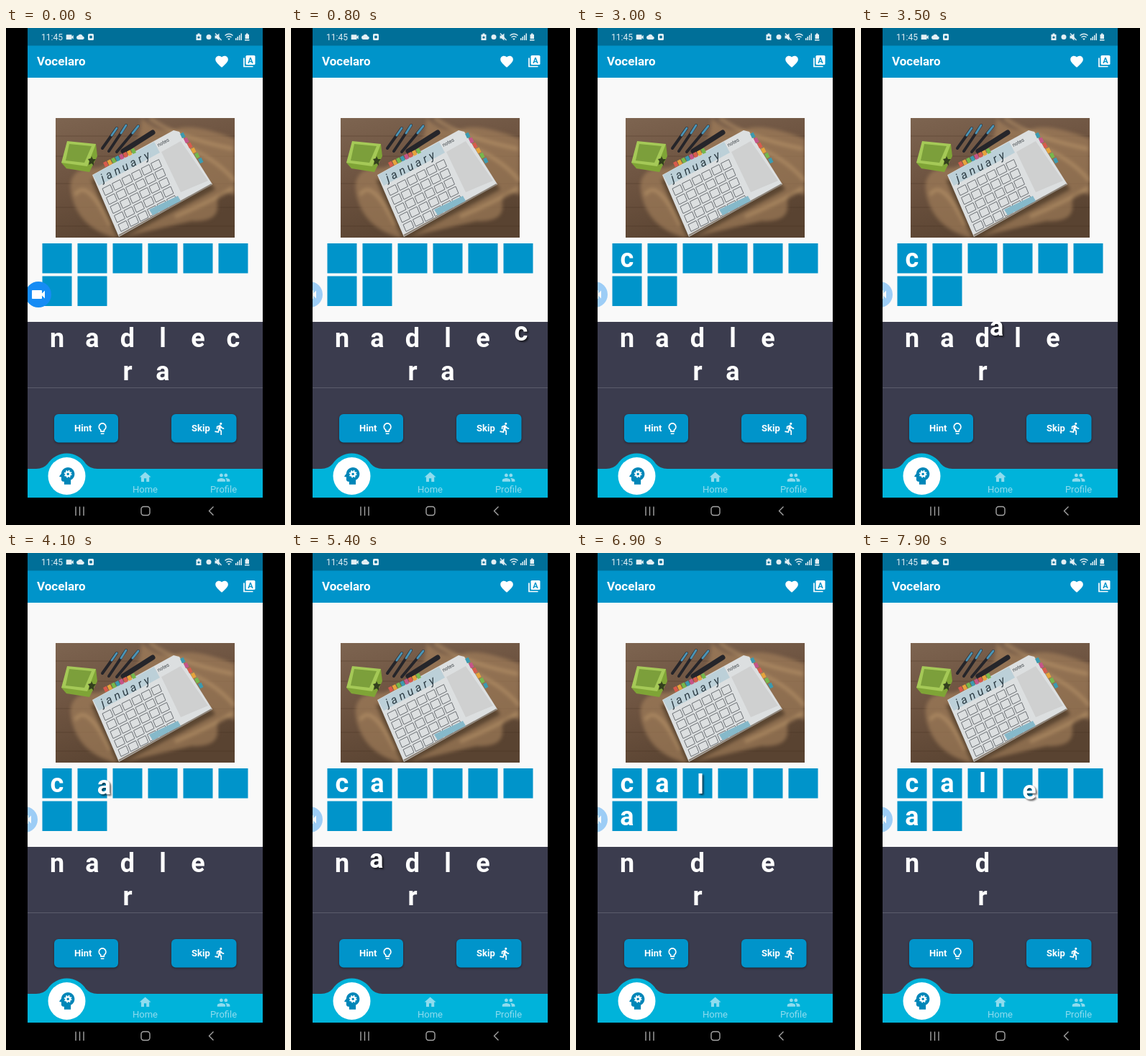
An HTML page for the animation above (8000 ms loop, 388 by 690 pixels).

```html
<!DOCTYPE html>
<html lang="en">
<head>
<meta charset="utf-8">
<title>Word puzzle</title>
<style>
  html, body { margin: 0; height: 100%; overflow: hidden; background: #000; }
  svg { display: block; width: 388px; height: 690px; font-family: Roboto, sans-serif; }
  .letter { font-size: 36px; font-weight: 700; fill: #fff; text-anchor: middle; }
  .dragged { filter: drop-shadow(2px 2px 1.2px rgba(0, 0, 0, .6)); }
  .button { filter: drop-shadow(0 1px 1.5px rgba(0, 0, 0, .45)); }
  .soft { filter: blur(2.5px); }
</style>
</head>
<body>
<svg viewBox="0 0 388 690">
  <defs>
    <clipPath id="screen"><path d="M30 0H357V652H30z"/></clipPath>
    <clipPath id="frame"><path d="M69 125H318V291H69z"/></clipPath>
    <linearGradient id="wood" x2=".4" y2="1">
      <stop stop-color="#7d6450"/><stop offset=".5" stop-color="#6d5340"/><stop offset="1" stop-color="#594331"/>
    </linearGradient>
    <path id="camera" d="M17 10.5V7c0-.55-.45-1-1-1H4c-.55 0-1 .45-1 1v10c0 .55.45 1 1 1h12c.55 0 1-.45 1-1v-3.5l4 4v-11l-4 4z"/>
  </defs>

  <path fill="#f9f9f9" d="M30 69H357V408H30z"/>
  <path fill="#006f98" d="M30 0H357V25H30z"/>
  <path fill="#0094ca" d="M30 24.500H357V69H30z"/>
  <path fill="#3b3c4e" d="M30 408H357V612H30z"/>
  <path stroke="#5b5c6b" d="M30 499.500H357"/>

  <!-- status bar -->
  <g fill="#e3eff4">
    <text x="49" y="17" font-size="12">11:45</text>
    <use href="#camera" transform="translate(82 6) scale(.56)"/>
    <path transform="translate(98 7) scale(.45)" d="M19.35 10.04C18.67 6.59 15.64 4 12 4 9.11 4 6.6 5.64 5.35 8.04 2.34 8.36 0 10.91 0 14c0 3.31 2.69 6 6 6h13c2.760 0 5-2.240 5-5 0-2.640-2.050-4.780-4.650-4.960z"/>
    <rect x="114" y="8" width="8" height="9" rx="1.500"/>
    <circle cx="118" cy="12.500" r="2" fill="#006f98"/>
    <path d="M264.500 9h2V7.500h3V9h2v8h-7z"/>
    <circle cx="268" cy="13" r="1.600" fill="#006f98"/>
    <circle cx="282" cy="12.500" r="3.500"/>
    <path d="M290.500 10.500h2.500l3.500-3v10l-3.500-3h-2.500z"/>
    <path d="M291 7.500l8.500 9.500" stroke="#e3eff4" stroke-width="1.300"/>
    <path d="M304.500 10.500q5.500-4.500 11 0M306.500 13q3.500-3 7 0" fill="none" stroke="#e3eff4" stroke-width="1.300"/>
    <path d="M308 14.500h4l-2 2.500zM319 14h1.500v3H319zM321.500 12h1.500v5h-1.500zM324 10h1.500v7H324zM326.500 7.500h1.500V17h-1.500z"/>
    <path d="M332.500 9h1.500V7.500h2.500V9h1.500v6h-5.500zM332 16h6.500v1.500H332z"/>
  </g>

  <!-- app bar -->
  <g fill="#fff">
    <text x="43" y="52" font-size="17" font-weight="700">Vocelaro</text>
    <path transform="translate(289.500 36) scale(.88)" d="M12 21.350l-1.450-1.320C5.400 15.360 2 12.280 2 8.500 2 5.420 4.420 3 7.500 3c1.740 0 3.410.810 4.500 2.090C13.090 3.810 14.760 3 16.500 3 19.580 3 22 5.420 22 8.500c0 3.780-3.400 6.860-8.550 11.540z"/>
    <rect x="333.500" y="38" width="13" height="13" rx="1.500"/>
    <path d="M331 41.500V53.500H343.500" fill="none" stroke="#fff" stroke-width="1.700"/>
    <text x="340" y="48.500" font-size="11" font-weight="700" text-anchor="middle" fill="#0094ca">A</text>
  </g>

  <!-- picture -->
  <g clip-path="url(#frame)">
    <path fill="url(#wood)" d="M69 125H318V291H69z"/>
    <path d="M69 150H318M69 178H318M69 216H318M69 249H318M69 275H318" stroke="#3d291b" opacity=".3"/>
    <g class="soft">
      <path fill="#a5825c" opacity=".65" d="M188 125Q214 148 238 140T318 154V232Q292 222 294 246T258 268L155 292Q104 280 92 236T128 194Q190 176 188 125z"/>
      <path d="M200 125Q232 150 316 168M250 165Q290 180 318 212M96 232Q112 206 145 274M235 262Q286 240 316 222" fill="none" stroke="#c39d70" stroke-width="5" opacity=".5"/>
      <path fill="#2b1e15" opacity=".5" d="M118 210L156 295 291 224 286 217z"/>
    </g>
    <path fill="#7fa436" d="M125 161L127 178 116 200 84 195 77 187z"/>
    <path fill="#a5c957" d="M85 157L125 161 113 192 77 187z"/>
    <path fill="#7c9f3b" d="M88 161L119 164 109 187 83 184z"/>
    <path fill="#33401d" d="M119 178l2 4 4 0-3 4 0 5-3-3-4 2 1-5-2-3 4-1z"/>
    <g stroke="#25252a" stroke-width="4" stroke-linecap="round">
      <path d="M134 167L154 139M143 171L167 135M154 172L184 136"/>
      <path d="M163 171L204 145" stroke-width="7"/>
      <path d="M147 149L154 139M160 146L167 135M176 146L184 136" stroke="#4b93b5" stroke-width="3"/>
    </g>
    <path fill="#dcdfe0" d="M120 204L233 142 241 144 287 217 157 290z"/>
    <path fill="#bcd0d8" d="M121 204L206 158 214 173 129 219z"/>
    <path fill="#cfd0d0" d="M216 172L243 157 281 212 243 228z"/>
    <path d="M157 288L286 217" stroke="#8b8176" stroke-width="2"/>
    <g id="tabs"></g>
    <text transform="translate(135 214) rotate(-27)" font-size="16" font-style="italic" letter-spacing="4" fill="#2b3a42">january</text>
    <text transform="translate(212 165) rotate(-28)" font-size="7" fill="#3c4246">notes</text>
    <path id="calendar" fill="none" stroke="#5f6468" stroke-width=".9"/>
    <path fill="#86b9ca" d="M199 252L239 233 243 240 204 260z"/>
  </g>

  <path id="slots" fill="#0094ca"/>

  <!-- buttons -->
  <g fill="#fff" font-size="13" font-weight="600">
    <g class="button" fill="#0094ca">
      <rect x="67" y="536" width="89" height="39.500" rx="6"/>
      <rect x="230" y="536" width="90.500" height="39.500" rx="6"/>
    </g>
    <text x="95" y="560">Hint</text>
    <text x="258" y="560">Skip</text>
    <path transform="translate(124.500 546.500) scale(.8)" d="M9 21c0 .55.45 1 1 1h4c.55 0 1-.45 1-1v-1H9v1zm3-19C8.140 2 5 5.140 5 9c0 2.380 1.190 4.470 3 5.740V17c0 .55.45 1 1 1h6c.55 0 1-.45 1-1v-2.260c1.810-1.270 3-3.360 3-5.740 0-3.860-3.140-7-7-7zm2.850 11.100l-.85.600V16h-4v-2.300l-.85-.600C7.800 12.160 7 10.630 7 9c0-2.760 2.240-5 5-5s5 2.240 5 5c0 1.630-.8 3.160-2.150 4.100z"/>
    <path transform="translate(288 546.500) scale(.8)" d="M13.490 5.480c1.100 0 2-.9 2-2s-.9-2-2-2-2 .9-2 2 .9 2 2 2zm-3.600 13.900l1-4.400 2.100 2v6h2v-7.500l-2.100-2 .6-3c1.300 1.500 3.300 2.500 5.500 2.500v-2c-1.900 0-3.500-1-4.300-2.400l-1-1.600c-.4-.6-1-1-1.700-1-.3 0-.5.1-.8.1l-5.200 2.200v4.700h2v-3.400l1.800-.7-1.600 8.100-4.900-1-.4 2 7 1.400z"/>
  </g>

  <!-- bottom bar -->
  <path fill="#00b3da" d="M30 612H42Q52 612 58 605A31.500 31.500 0 0 1 111 605Q117 612 127 612H357V652H30z"/>
  <circle cx="84.500" cy="622" r="26" fill="#fff"/>
  <g transform="translate(69 606) scale(1.320)">
    <path fill="#0086b8" d="M13 3C9.230 3 6.190 5.950 6 9.660l-1.920 2.530c-.24.310 0 .810.420.810H6v3c0 1.100.9 2 2 2h1v3h7v-4.690c2.370-1.120 4-3.510 4-6.310 0-3.860-3.120-7-7-7z"/>
    <circle cx="13" cy="10" r="2.200" fill="none" stroke="#fff" stroke-width="1.700"/>
    <circle cx="13" cy="10" r="3.500" fill="none" stroke="#fff" stroke-width="1.200" stroke-dasharray="1.400 1.350"/>
  </g>
  <g fill="#8fdcee" font-size="13" text-anchor="middle">
    <path transform="translate(184 614) scale(.8)" d="M10 20v-6h4v6h5v-8h3L12 3 2 12h3v8z"/>
    <path transform="translate(293 614.500) scale(.8)" d="M16 11c1.660 0 2.990-1.340 2.990-3S17.660 5 16 5s-3 1.340-3 3 1.340 3 3 3zm-8 0c1.660 0 2.990-1.340 2.990-3S9.660 5 8 5 5 6.340 5 8s1.340 3 3 3zm0 2c-2.330 0-7 1.170-7 3.500V19h14v-2.500c0-2.330-4.670-3.500-7-3.500zm8 0c-.29 0-.62.02-.97.05 1.160.840 1.970 1.970 1.970 3.450V19h6v-2.500c0-2.330-4.670-3.500-7-3.500z"/>
    <text x="193.500" y="644.500">Home</text>
    <text x="302.500" y="644.500">Profile</text>
  </g>
  <g fill="none" stroke="#a4a4a4" stroke-width="1.400">
    <path d="M97 664.500V677M102.500 664.500V677M108 664.500V677M288.500 664.500L282.500 670.500 288.500 676.500"/>
    <rect x="188" y="664.500" width="12" height="12" rx="3.500"/>
  </g>

  <g id="letters"></g>
  <g clip-path="url(#screen)">
    <g id="bubble">
      <circle r="18" fill="#168cf4"/>
      <use href="#camera" fill="#fff" transform="translate(-12 -12)"/>
    </g>
  </g>
</svg>
<script>
const byId = id => document.getElementById(id);
const addSvg = (parent, tag, attrs) => {
  const node = document.createElementNS('http://www.w3.org/2000/svg', tag);
  for (const key in attrs) node.setAttribute(key, attrs[key]);
  return parent.appendChild(node);
};
const columnX = i => 71 + 49 * i;

let slots = '', cells = '';
for (let i = 0; i < 8; i++) slots += `M${50.5 + 49 * (i % 6)} ${i < 6 ? 299 : 344.5}h41v41.500h-41z`;
byId('slots').setAttribute('d', slots);

for (let row = 0; row < 5; row++)
  for (let col = 0; col < 6; col++)
    cells += `M${134 + col * 13.5 + row * 5.5} ${223 - col * 7 + row * 12.5}l11-5.500 4 9.500-11 5.500z`;
byId('calendar').setAttribute('d', cells);

const tabColors = ['#d85b4c', '#e6a43b', '#75b84c', '#3c9aaf', '#c65489'];
for (let i = 0; i < 14; i++) {
  const [x, y] = i < 8 ? [135 + i * 5.5, 187 - i * 2.6] : [242 + (i - 8) * 5, 147 + (i - 8) * 7];
  addSvg(byId('tabs'), 'rect', { x, y, width: 5, height: 7, fill: tabColors[i % 5], transform: `rotate(-26 ${x} ${y})` });
}

// Each letter: home position and, if dragged, [time, x, baseline] points, then drop time and slot.
const letters = [
  { char: 'n', home: [columnX(0), 443] },
  { char: 'a', home: [columnX(1), 443], path: [[5400, 119, 437], [5800, 74, 381]], drop: 5900, slot: [columnX(0), 378] },
  { char: 'd', home: [columnX(2), 443] },
  { char: 'l', home: [columnX(3), 443], path: [[6500, 217, 435], [6900, 173, 334]], drop: 7000, slot: [columnX(2), 332] },
  { char: 'e', home: [columnX(4), 443], path: [[7600, 265, 430], [7900, 234, 342]], drop: 8000 },
  { char: 'c', home: [columnX(5), 443], path: [[800, 320, 434], [1600, 82, 335], [1800, 78, 332]], drop: 2000, slot: [columnX(0), 332] },
  { char: 'r', home: [columnX(2), 489] },
  { char: 'a', home: [columnX(3), 489], path: [[3200, 219, 483], [3900, 142, 341], [4100, 136.5, 335], [4300, 124, 333]], drop: 4400, slot: [columnX(1), 332] }
];
for (const letter of letters) {
  letter.node = addSvg(byId('letters'), 'text', { class: 'letter' });
  letter.node.textContent = letter.char;
}

const ease = p => p * p * (3 - 2 * p);
const mix = (a, b, p) => a + (b - a) * p;

function along(path, time) {
  const next = path.findIndex(point => point[0] > time);
  if (next < 0) return path[path.length - 1].slice(1);
  const [a, b] = [path[next - 1], path[next]];
  const p = ease((time - a[0]) / (b[0] - a[0]));
  return [mix(a[1], b[1], p), mix(a[2], b[2], p)];
}

function draw(now) {
  const time = Math.floor(now % 8000 / 100) * 100;
  for (const { node, home, path, drop, slot } of letters) {
    const dragging = path && time >= path[0][0] && time < drop;
    const [x, y] = dragging ? along(path, time) : path && time >= drop ? slot : home;
    node.setAttribute('x', x);
    node.setAttribute('y', y);
    node.classList.toggle('dragged', Boolean(dragging));
  }
  const hide = Math.min(time / 300, 1);
  byId('bubble').setAttribute('transform', `translate(${mix(45, 26, hide)} 370)`);
  byId('bubble').setAttribute('opacity', mix(1, .4, hide));
  requestAnimationFrame(draw);
}
draw(0);
</script>
</body>
</html>
```
